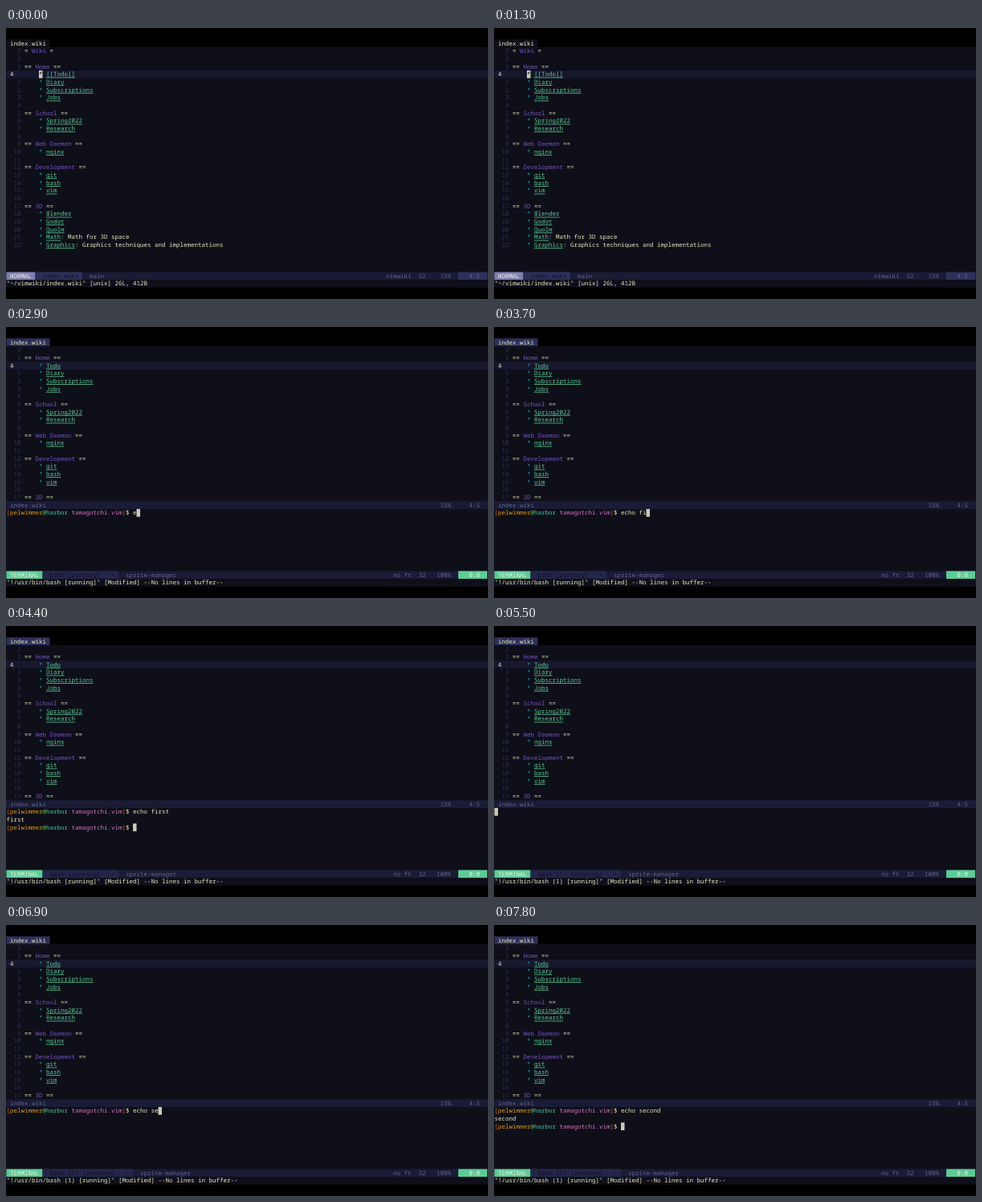
These frames come from a looping animation (600x338 px, 8 s). An HTML page:

```html
<!DOCTYPE html>
<html lang="en">
<head>
<meta charset="utf-8">
<title>Wiki and terminals</title>
<style>
  html, body { margin: 0; width: 100%; height: 100%; overflow: hidden; background: #000; }
  svg { display: block; width: 100vw; height: 100vh; }
  text {
    font: 7.5px "Noto Sans Mono", "DejaVu Sans Mono", monospace;
    white-space: pre;
    text-rendering: geometricPrecision;
  }
</style>
</head>
<body>
<svg id="stage" viewBox="0 0 600 338" preserveAspectRatio="none"></svg>
<script>
const LOOP = 8000, LEFT = 0.5, TOP = 14.2, CELL = 4.5, ROW = 9.673, COLS = 133;

const C = {
  bg: '#0e0f19', fg: '#e4e8bc', line: '#17182e', bar: '#1a1b35', seg: '#2d3059',
  segDim: '#23264a', dim: '#30345a', grey: '#62668f', ink: '#10111f',
  purple: '#7653c4', green: '#5ccc96', teal: '#12a3a8', mode: '#7f7fb0',
  cursor: '#c9cbb9', white: '#eef1e2',
  red: '#dd5a1c', gold: '#dc9a18', lime: '#62bf35', sea: '#4bc5a4', pink: '#d673c2'
};

const WIKI = [
  '= Wiki =', '', '== Home ==', '* [Todo]', '* [Diary]', '* [Subscriptions]', '* [Jobs]', '',
  '== School ==', '* [Spring2022]', '* [Research]', '',
  '== Web Daemon ==', '* [nginx]', '',
  '== Development ==', '* [git]', '* [bash]', '* [vim]', '',
  '== 3D ==', '* [Blender]', '* [Godot]', '* [Quolm]', '* [Math]: Math for 3D space',
  '* [Graphics]: Graphics techniques and implementations'
];
const CURRENT = 3;

const PROMPT = [
  ['[', C.red], ['pelwimmer', C.gold], ['@', C.lime], ['harbor ', C.sea],
  ['tamagotchi.vim', C.pink], [']', C.red], ['$ ', C.fg]
];

// Each session: opening time, prompt time, key times, time of Enter
const SESSIONS = [
  { name: 'bash', open: 1500, ready: 1900, enter: 4300, cmd: 'echo first',
    keys: [2900, 3000, 3100, 3200, 3300, 3600, 3700, 3800, 3900, 4000] },
  { name: 'bash (1)', open: 5400, ready: 6000, enter: 7700, cmd: 'echo second',
    keys: [6300, 6400, 6500, 6500, 6600, 6800, 6900, 7000, 7100, 7200, 7300] }
];
SESSIONS[1].enter = 7800;

const stage = document.getElementById('stage');
let out;

const px = col => LEFT + col * CELL;
const py = row => TOP + row * ROW;

function rect(x, y, w, h, fill) {
  out += `<rect x="${x}" y="${y.toFixed(2)}" width="${w}" height="${h}" fill="${fill}"/>`;
}
function box(row, col, n, fill) {
  rect(px(col), py(row), n * CELL, ROW, fill);
}
function strip(row, fill, rows = 1) {
  rect(0, py(row), 600, ROW * rows, fill);
}
function put(row, col, str, fill) {
  const safe = str.replace(/&/g, '&amp;').replace(/</g, '&lt;');
  out += `<text x="${px(col)}" y="${(py(row) + 7.4).toFixed(2)}" fill="${fill}">${safe}</text>`;
  return col + str.length;
}
function cursor(row, col) {
  box(row, col, 1, C.cursor);
}

function link(row, col, str) {
  rect(px(col), py(row) + 8.6, str.length * CELL, 0.8, C.green);
  return put(row, col, str, C.green);
}

function wikiLine(i, row, focused) {
  const here = i === CURRENT;
  if (here) {
    strip(row, C.line);
    put(row, 1, '4', C.fg);
  } else {
    put(row, 1, String(Math.abs(i - CURRENT)).padStart(3), C.dim);
  }
  const head = WIKI[i].match(/^(=+ )(.*?)( =+)$/);
  const item = WIKI[i].match(/^\* \[(.*?)\](.*)$/);
  if (head) {
    const a = put(row, 5, head[1], C.fg);
    put(row, put(row, a, head[2], C.purple), head[3], C.fg);
  } else if (item) {
    const active = here && focused;
    if (active) cursor(row, 9);
    put(row, 9, '*', active ? C.ink : C.teal);
    const end = link(row, 11, active ? `[[${item[1]}]]` : item[1]);
    if (item[2]) put(row, end, item[2], C.fg);
  }
}

function statusBar(s) {
  const modeEnd = s.mode.length + 2, nameCol = modeEnd + 2;
  const segEnd = nameCol + s.file.length + 1;
  strip(30, C.bar);
  box(30, 0, modeEnd, s.color);
  box(30, modeEnd, segEnd - modeEnd, s.seg);
  box(30, 125, COLS - 125, s.posColor);
  put(30, 1, s.mode, C.white);
  put(30, nameCol, s.file, C.ink);
  put(30, segEnd + 2, s.branch, C.grey);
  put(30, 112 - s.type.length, s.type, C.grey);
  put(30, 114, '32', C.grey);
  put(30, 123 - s.percent.length, s.percent, C.grey);
  put(30, 128, s.pos, s.posInk);
}

function tab(fill) {
  box(0, 0, 12, fill);
  put(0, 1, 'index.wiki', C.fg);
}

function editor() {
  tab(C.bg);
  WIKI.forEach((_, i) => wikiLine(i, i + 1, true));
  for (let r = 27; r < 30; r++) put(r, 0, '~', C.dim);
  statusBar({
    mode: 'NORMAL', color: C.mode, file: 'index.wiki', seg: C.seg, branch: 'main',
    type: 'vimwiki', percent: '15%', pos: '4:5', posColor: C.seg, posInk: C.grey
  });
  put(31, 0, '"~/vimwiki/index.wiki" [unix] 26L, 412B', C.fg);
}

function prompt(row, typed) {
  let col = 0;
  for (const [str, fill] of PROMPT) col = put(row, col, str, fill);
  return put(row, col, typed, C.fg);
}

function split(s, typed, ready, done) {
  tab(C.seg);
  for (let i = 1; i <= 20; i++) wikiLine(i, i, false);
  strip(21, C.bar);
  put(21, 1, 'index.wiki', C.grey);
  put(21, 120, '15%', C.grey);
  put(21, 128, '4:5', C.grey);

  let row = 22, col = 0;
  if (ready) col = prompt(row, s.cmd.slice(0, typed));
  if (done) {
    put(23, 0, s.cmd.slice(5), C.fg);
    row = 24;
    col = prompt(row, '');
  }
  cursor(row, col);

  statusBar({
    mode: 'TERMINAL', color: C.green, file: s.name + ' [running]   +', seg: C.segDim,
    branch: 'sprite-manager', type: 'no ft', percent: '100%', pos: '0:0',
    posColor: C.green, posInk: C.white
  });
  put(31, 0, `"!/usr/bin/${s.name} [running]" [Modified] --No lines in buffer--`, C.fg);
}

let last = '';
function draw(t) {
  const s = SESSIONS.filter(x => t >= x.open).pop();
  const typed = s ? s.keys.filter(k => t >= k).length : 0;
  const ready = s && t >= s.ready, done = s && t >= s.enter;
  const state = [s && s.name, typed, ready, done].join();
  if (state === last) return;
  last = state;
  out = '';
  rect(0, 0, 600, 338, '#000');
  strip(1, C.bg, 31);
  if (s) split(s, typed, ready, done);
  else editor();
  stage.innerHTML = out;
}

const start = performance.now();
function tick() {
  draw((performance.now() - start) % LOOP);
  requestAnimationFrame(tick);
}
tick();
</script>
</body>
</html>
```
